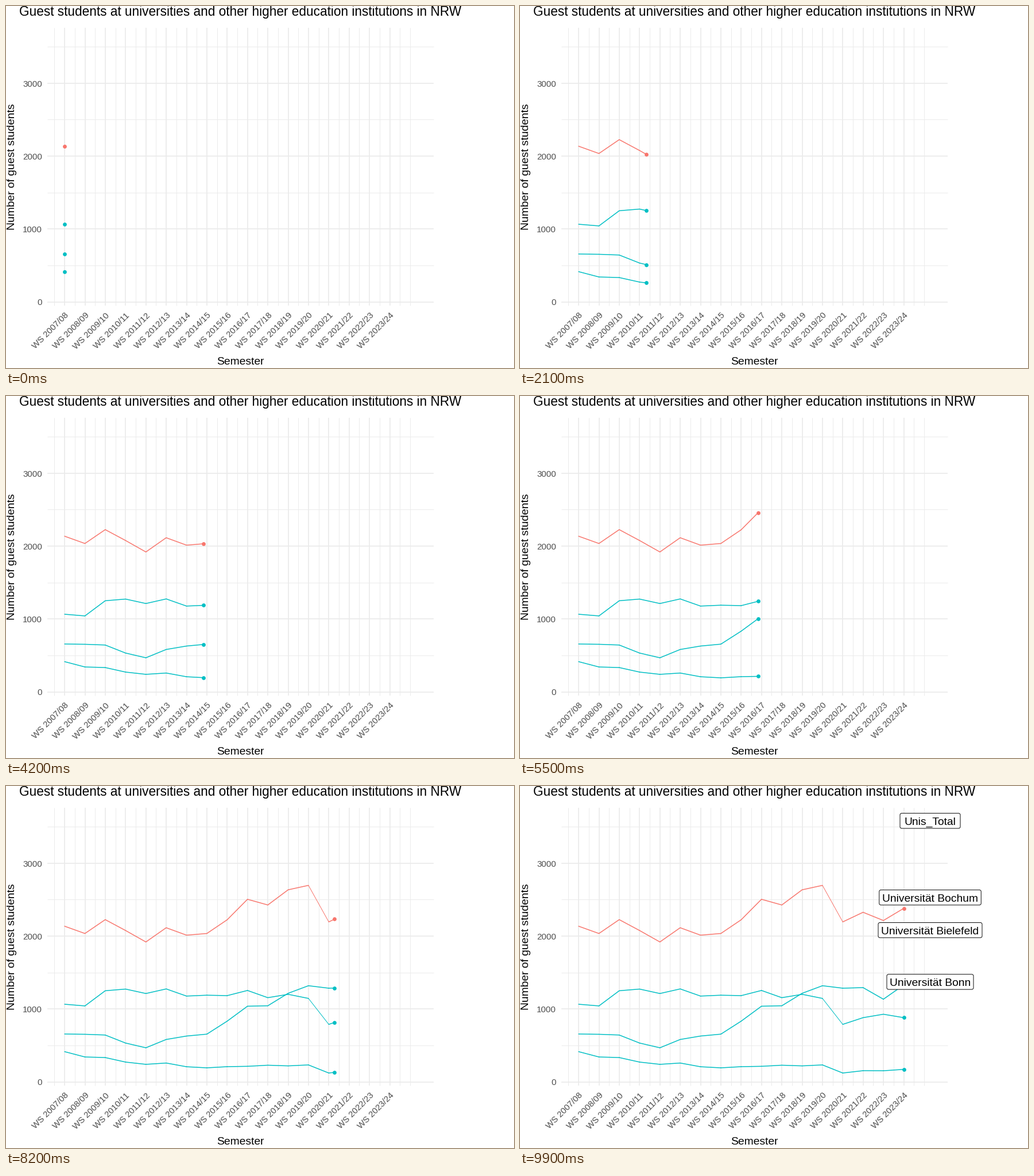
These frames come from a looping animation (885x632 px, 10 s). A matplotlib script:

```python
import numpy as np
import matplotlib.pyplot as plt
from matplotlib.animation import FuncAnimation
from matplotlib.collections import LineCollection
from matplotlib.patches import FancyBboxPatch

W, H, DPI = 885, 632, 64
PT = 72 / DPI  # points per pixel
FRAMES, INTERVAL = 100, 100
RED, TEAL, GRID, GREY = "#F8766D", "#00BFC4", "#EBEBEB", "#4D4D4D"
LEFT, RIGHT, TOP, BOTTOM = 72, 744.5, 38, 523

plt.rcParams["font.family"] = "Liberation Sans"

bielefeld = np.array([1064, 1041, 1249, 1272, 1211, 1274, 1176, 1188, 1182,
                      1253, 1154, 1200, 1144, 788, 880, 927, 880])
bochum = np.array([656, 652, 642, 532, 467, 581, 628, 654, 832,
                   1037, 1043, 1214, 1318, 1284, 1292, 1133, 1328])
bonn = np.array([414, 341, 333, 271, 240, 258, 207, 192, 208,
                 213, 228, 219, 232, 121, 153, 152, 171])
total = bielefeld + bochum + bonn
series = [(total, RED), (bielefeld, TEAL), (bochum, TEAL), (bonn, TEAL)]

N = len(total)
# each semester is reached on a whole frame
key = np.floor((FRAMES - 1) * np.arange(N) / (N - 1) + 0.5)


def px(i):
    return 102.1 + 35.4 * i


def py(v):
    return 516.5 - 0.12733 * v


fig = plt.figure(figsize=(W / DPI, H / DPI), dpi=DPI, facecolor="white")
ax = fig.add_axes([0, 0, 1, 1])
ax.set_xlim(0, W)
ax.set_ylim(H, 0)
ax.axis("off")


def write(x, y, s, size, color="black", ha="center", **kw):
    return ax.text(x, y, s, fontsize=size * PT, color=color, ha=ha,
                   va="baseline", rotation_mode="anchor", **kw)


def rule(xs, ys, width):
    ax.plot(xs, ys, color=GRID, lw=width * PT, solid_capstyle="butt", zorder=1)


# grid
for i in np.append(np.arange(-0.5, 17), 17):
    rule([px(i)] * 2, [TOP, BOTTOM], 1)
for v in range(500, 3501, 1000):
    rule([LEFT, RIGHT], [py(v)] * 2, 1)
for i in range(N):
    rule([px(i)] * 2, [TOP, BOTTOM], 1.8)
for v in range(0, 3001, 1000):
    rule([LEFT, RIGHT], [py(v)] * 2, 1.8)

# titles and tick labels
write(23, 17.5, "Guest students at universities and other higher education "
      "institutions in NRW", 22.65, ha="left")
write(408, 626.5, "Semester", 19.2)
write(15.5, 281, "Number of guest students", 19.2, rotation=90)
for v in range(0, 3001, 1000):
    write(63, py(v) + 6, str(v), 15, GREY, "right")
for i in range(N):
    write(px(i) + 7.9, 540.8, f"WS {2007 + i}/{8 + i:02d}", 15, GREY, "right",
          rotation=45)

# growing lines with a dot at the tip
lines, dots = [], []
for _, color in series:
    line = LineCollection([], colors=color, capstyle="round", zorder=2)
    ax.add_collection(line, autolim=False)
    lines.append(line)
    dots += ax.plot([], [], "o", color=color, ms=6.8 * PT, mew=0, zorder=3)

# closing name tags
tags = []
for name, data, width in [("Unis_Total", total, 105),
                          ("Universität Bochum", bochum, 177.5),
                          ("Universität Bielefeld", bielefeld, 181),
                          ("Universität Bonn", bonn, 151)]:
    x, y = px(17.3), py(data[-1] + 1200)
    box = FancyBboxPatch((x - width / 2, y - 13.2), width, 26.4,
                         boxstyle="round,pad=0,rounding_size=3",
                         fc="white", ec="black", lw=0.95 * PT, zorder=4)
    ax.add_patch(box)
    tags += [box, write(x - 0.3, y + 7, name, 19.3, zorder=5)]


def update(frame):
    past = key < frame
    step = np.interp(frame, key, np.arange(N))
    xs = px(np.append(np.arange(N)[past], step))
    for (data, _), line, dot in zip(series, lines, dots):
        tip = np.interp(frame, key, data)
        ys = py(np.append(data[past], tip))
        pts = np.column_stack([xs, ys])
        steep = np.abs(np.diff(ys)) > 1.05 * np.diff(xs)
        line.set_segments(list(np.stack([pts[:-1], pts[1:]], axis=1)))
        line.set_linewidths(np.where(steep, 1.0, 1.5) * PT if len(steep) else [1])
        dot.set_data([xs[-1]], [ys[-1]])
    for tag in tags:
        tag.set_visible(frame == FRAMES - 1)
    return lines + dots + tags


anim = FuncAnimation(fig, update, frames=FRAMES, interval=INTERVAL,
                     repeat=True, repeat_delay=0, blit=False)
plt.show()
```
